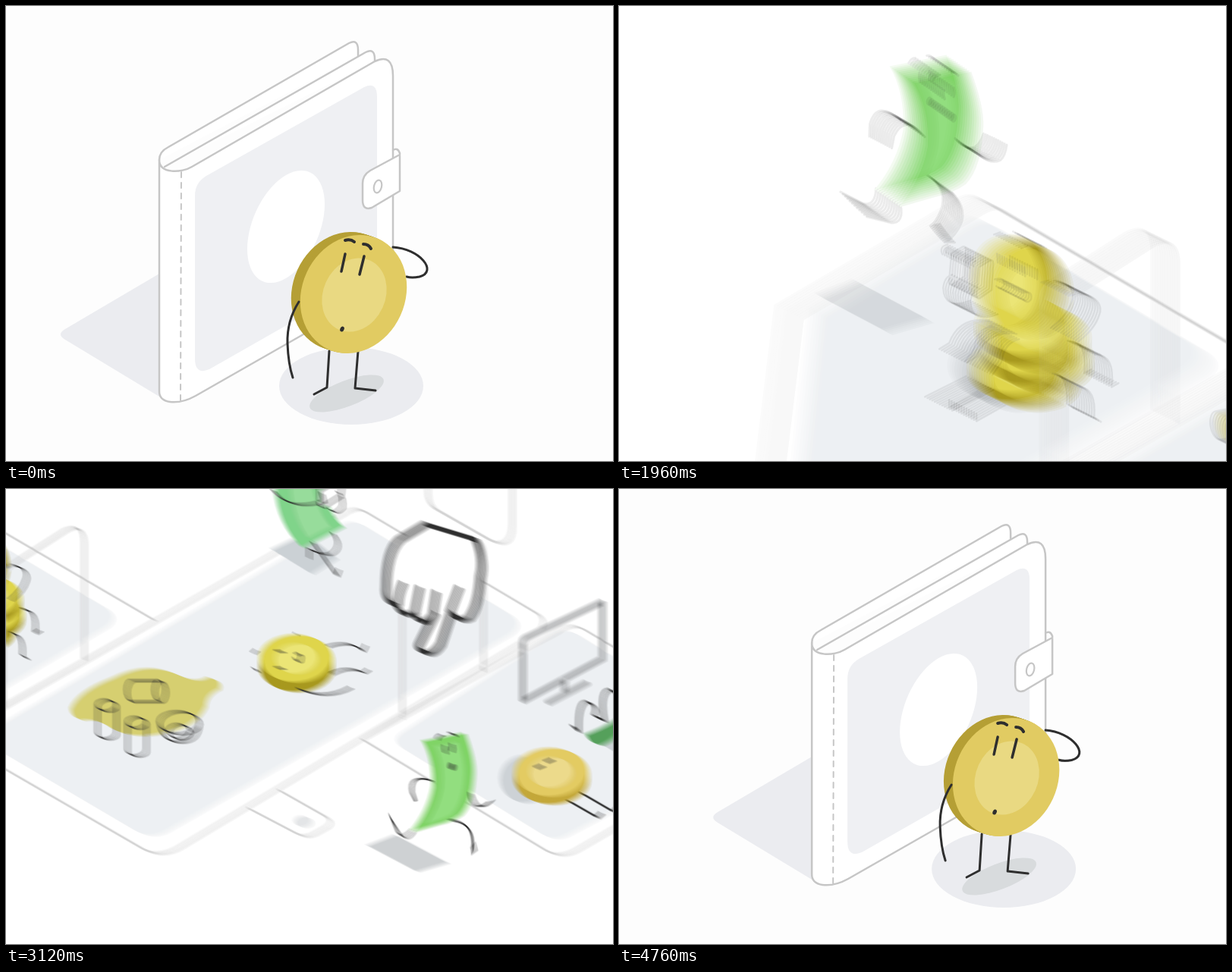
An HTML page with a canvas for the animation above (4.8 s loop, 800 by 600 pixels).

```html
<!DOCTYPE html>
<html lang="en">
<head>
<meta charset="utf-8">
<title>Runaway banknote</title>
<style>
html, body { margin: 0; width: 100%; height: 100%; overflow: hidden; background: #fdfdfd; }
canvas { display: block; width: 800px; height: 600px; }
</style>
</head>
<body>
<canvas id="stage" width="800" height="600"></canvas>
<script>
const LOOP = 4800, STEP = 40, SHUTTER = 15, SAMPLES = 12;
const INK = '#2e2e2e', LINE = '#c6c6c6', PALE = '#d3d3d3', PANEL = '#edf0f3';
const GOLD = { face: '#dfd54b', edge: '#a8991f', core: '#ebe576' };
const SAND = { face: '#e3cb62', edge: '#c4a83a', core: '#ecda8b' };

const screen = document.getElementById('stage').getContext('2d');
const buffer = document.createElement('canvas');
buffer.width = 800;
buffer.height = 600;
const g = buffer.getContext('2d');
g.lineCap = g.lineJoin = 'round';

const clamp = v => Math.max(0, Math.min(1, v));
const ramp = (t, a, b) => clamp((t - a) / (b - a));
const smooth = u => u * u * (3 - 2 * u);
const swing = (t, at, period) => Math.sin((t - at) / period * 2 * Math.PI);

function paint(p, fill, stroke, width = 2.5) {
  if (fill) { g.fillStyle = fill; g.fill(p); }
  if (stroke) { g.strokeStyle = stroke; g.lineWidth = width; g.stroke(p); }
}
const shape = (d, fill, stroke, width) => paint(new Path2D(d), fill, stroke, width);
const ink = (d, width = 2.5) => shape(d, null, INK, width);

function oval(x, y, rx, ry, turn, fill, stroke, width) {
  const p = new Path2D();
  p.ellipse(x, y, rx, ry, turn, 0, 2 * Math.PI);
  paint(p, fill, stroke, width);
}

function at(x, y, turn, scale, draw) {
  g.save();
  g.translate(x, y);
  g.rotate(turn);
  g.scale(scale, scale);
  draw();
  g.restore();
}
const limb = (x, y, turn, d, width = 3) => at(x, y, turn, 1, () => ink(d, width));

// Smooth curve through rows of [time, ...values]
function track(rows, t) {
  const last = rows.length - 1;
  if (t <= rows[0][0]) return rows[0].slice(1);
  if (t >= rows[last][0]) return rows[last].slice(1);
  const i = rows.findIndex((r, n) => n < last && t < rows[n + 1][0]);
  const a = rows[i], b = rows[i + 1], span = b[0] - a[0], u = (t - a[0]) / span;
  const slope = (n, c) => {
    const p = rows[Math.max(0, n - 1)], q = rows[Math.min(last, n + 1)];
    return (q[c] - p[c]) / (q[0] - p[0]) * span;
  };
  return a.slice(1).map((v, n) => {
    const c = n + 1, e = smooth(u);
    return v + (b[c] - v) * e + slope(i, c) * u * (1 - u) ** 2 - slope(i + 1, c) * u * u * (1 - u);
  });
}

// ---------- wallet ----------

function wallet() {
  shape('M202 353 L78 426 Q66 433 78 440 L202 515Z', '#ebecf0');
  oval(455, 501, 95, 51, 0, '#ebecf0');
  shape('M202 203 Q202 192 214 186 L452 49 Q464 43 464 58 V66', '#fff', LINE);
  shape('M209 212 L474 61 Q486 55 486 70 V73', '#fff', LINE);
  shape('M202 203 C202 222 232 220 245 212 L486 73 Q510 62 510 92 V340 Q510 366 490 377 ' +
    'L250 514 Q232 524 216 522 Q202 520 202 508Z', '#fff', LINE);
  g.setLineDash([7, 7]);
  shape('M231 219 L230 522', null, LINE, 2);
  g.setLineDash([]);
  shape('M249 250 Q249 233 264 224 L472 107 Q489 99 489 120 V338 Q489 353 475 361 ' +
    'L268 479 Q249 487 249 465Z', '#eff0f3');
  paint(hole(), '#fff');
  shape('M510 190 Q516 186 519 194 V244 L482 266 Q470 270 470 256 V234 Q470 223 480 217 L519 196',
    '#fff', LINE);
  oval(490, 238, 5, 8.5, 0.25, '#fff', LINE, 2.2);
}

function hole() {
  const p = new Path2D(), disc = new Path2D();
  disc.ellipse(0, 0, 51, 68, 0, 0, 2 * Math.PI);
  p.addPath(disc, new DOMMatrix([1, -0.577, 0, 1, 369, 291]));
  return p;
}

function peeker(t) {
  if (t < 440 || t > 1760) return;
  const drop = 200 * (1 - smooth(ramp(t, 440, 620)));
  const sway = -3.5 + 3.5 * Math.cos((t - 840) / 640 * Math.PI);
  const clip = hole();
  clip.rect(202, 0, 400, 291);
  g.save();
  g.clip(clip);
  g.translate(sway, drop);
  shape('M303 230 L390 178 Q417 240 406 312 L398 324 Q385 348 354 355 Q332 353 324 345 ' +
    'Q332 320 331 292 Q329 256 303 230Z', '#80c47e');
  shape('M326 241 L384 206 Q399 250 394 304 L397 326 Q384 347 354 354 Q342 354 334 350 ' +
    'Q342 318 341 290 Q340 262 326 241Z', '#92cb8e');
  shape('M396 300 L406 306 L398 323 L393 322Z', '#80c47e');
  ink('M348 218 L354 232 M362 211 L369 225', 3.2);
  ink('M331 190 Q335 185 340 184 M353 183 Q359 181 364 183', 3);
  shape('M374 295 Q379 288 384 290 Q387 283 390 288 Q392 295 393 303 Q381 302 374 295Z', INK);
  g.restore();
}

function coin(t) {
  const d = t > 4400 ? 0 : Math.max(0, t - 600);
  if (d > 760) return;
  const k = clamp(d / 240), mix = (a, b) => a + (b - a) * k;
  const dx = 0.6 * d + 0.001 * Math.max(0, d - 400) ** 2;
  const lift = 72 * Math.abs(Math.sin(d / 480 * Math.PI));
  const scared = k > 0.2;
  oval(449 + dx, 511 - 0.68 * dx, mix(52, 45), mix(17, 15), -0.37, '#d8dbdd');
  at(458 + dx, 380 - 0.68 * dx - lift, 0, 1, () => {
    const w = swing(t, 840, 200);
    if (scared) {
      limb(-44, 76, 0.45 * w, 'M0 0 Q-16 20 -18 42 L20 36');
      limb(4, 83, -0.22 * w, 'M0 0 Q22 24 25 72 L55 58');
      limb(58, 3, -0.5 * w, 'M0 0 Q34 -8 45 -60');
    } else {
      ink('M-32 75 L-35 123 L-52 132 M6 75 L2 124 L29 127', 3);
      limb(52, -62, 0.03 * Math.sin(t / 90), 'M0 0 C35 2 60 32 35 39 Q25 41 18 39');
    }
    const rx = mix(68, 58), ry = mix(80, 87), turn = mix(0.43, 0.16);
    for (let i = 6; i >= 0; i--) {
      oval(-mix(12, 16) * i / 6, -mix(4, 6) * i / 6, rx, ry, turn, i ? '#b59f35' : '#e1cb62');
    }
    oval(1, 1, mix(41, 37), mix(50, 53), turn, '#e9d982');
    if (scared) {
      ink('M-36 -44 V-20 M-15 -47 V-24', 3.5);
      ink('M-49 -67 Q-42 -73 -36 -73 M-18 -73 Q-10 -74 -5 -71', 4);
      shape('M6 49 Q8 36 18 30 Q26 28 25 36 Q21 49 6 49Z', INK);
      ink('M-83 -39 L-76 -38 M-73 -69 L-67 -63 M42 -84 L46 -90 M55 -63 L62 -66', 3.2);
      limb(-69, 17, -0.3 * w, 'M0 0 Q-25 3 -38 31 Q-47 52 -47 81');
    } else {
      ink('M-11 -53 L-16 -30 M14 -50 L8 -26', 3.5);
      ink('M-11 -71 Q-4 -73 1 -69 M13 -66 Q20 -66 23 -60', 4);
      oval(-15, 46, 2.6, 3.6, 0.4, INK);
      ink('M-72 10 Q-88 35 -87 65 Q-86 92 -80 110', 3);
    }
  });
}

// ---------- desk world ----------

function camera(t) {
  const u = ramp(t, 2320, 3120);
  const rush = 900 * (1 - ramp(t, 1800, 2320)) ** 2;
  const late = Math.max(0, t - 3120), exit = 0.0008 * Math.max(0, t - 3680) ** 2;
  return {
    x: 672 - 289 * u * u - 0.69 * late - exit + rush,
    y: 332 - 102 * u * u - 0.35 * late - exit / 2 + rush / 2,
    s: 1.37 - 0.37 * smooth(u)
  };
}

function disc(x, y, rx, ry, h, c) {
  for (let i = h; i > 0; i -= 2) oval(x, y + i, rx, ry, 0, c.edge);
  oval(x, y, rx, ry, 0, c.face);
  oval(x, y, rx * 0.61, ry * 0.64, 0, c.core);
}

function glass(x, y) {
  shape(`M${x - 17} ${y} V${y + 50} A17 10 0 0 0 ${x + 17} ${y + 50} V${y}`, null, INK);
  oval(x, y, 17, 10, 0, null, INK, 2.5);
}

function sheets() {
  shape('M-260 123 L-84 20 Q-74 14 -64 20 L196 172 L-109 344 L-300 450Z', '#fff', PALE);
  shape('M-230 125 L-90 40 Q-78 32 -66 38 L132 156 Q148 168 132 180 L-109 322 L-260 410Z', PANEL);
  shape('M-74 326 L444 31 Q460 20 476 30 L700 163 Q714 173 700 188 L231 469 Q205 486 180 473Z',
    '#fff', PALE);
  shape('M-20 317 L438 48 Q455 38 470 46 L664 164 Q682 177 664 190 L212 449 Q192 460 172 450 ' +
    'L-20 337 Q-34 327 -20 317Z', PANEL);
  shape('M320 420 L383 453 Q395 459 406 453 L422 444 Q432 437 420 430 L360 396', null, PALE);
  oval(391, 437, 11, 7, 0, '#e3e5e7');
  shape('M468 328 L734 182 Q748 176 762 184 L978 313 Q1000 327 980 342 L752 474 Q731 486 711 475Z',
    '#fff', PALE);
  shape('M522 320 L722 190 Q737 182 752 190 L960 318 Q972 328 960 338 L740 454 Q723 463 707 454 ' +
    'L522 340 Q508 330 522 320Z', PANEL);
  shape('M555 -60 V0 Q554 18 566 25 L638 66 Q666 78 666 46 V-60', null, PALE, 3);
}

const leaf = (x, y) =>
  shape(`M${x} ${y} V${y - 168} Q${x} ${y - 180} ${x + 10} ${y - 186} L${x + 82} ${y - 232} ` +
    `Q${x + 107} ${y - 244} ${x + 107} ${y - 214} V${y - 62}`, null, LINE, 2.6);

function stack() {
  oval(75, 270, 56, 42, 0.1, '#c9cdd0');
  ink('M48 280 L-10 309 M63 300 L22 323 V313');
  disc(103, 266, 58, 34, 12, GOLD);
  disc(119, 239, 59, 36, 14, GOLD);
  disc(114, 211, 60, 37, 14, GOLD);
  for (let i = 5; i >= 0; i--) oval(92 + i * 2.8, 156 - i * 0.4, 45, 60, -0.05, i ? GOLD.edge : GOLD.face);
  oval(92, 157, 27, 36, -0.05, GOLD.core);
  ink('M85 120 L86 132 M102 123 V136 M82 154 Q96 150 94 162 Q90 169 84 163');
  ink('M81 95 L89 92 M106 91 L114 95');
  ink('M75 208 Q35 203 22 238 L9 246 M78 215 Q58 220 55 245 L43 262');
  ink('M178 235 Q205 235 200 278 L209 273 M158 278 Q180 280 177 318 L186 324');
  ink('M143 158 C170 150 190 165 184 182 Q178 202 156 218');
  shape('M25 120 L40 111 Q44 110 44 115 L42 150 L26 161 Q21 162 22 155Z', '#fff', INK);
  ink('M50 182 Q15 195 14 165 Q16 150 26 148 M18 119 Q15 114 21 112 M13 121 Q8 111 20 108', 2.3);
}

function napper(t) {
  const rest = smooth(ramp(t, 2440, 2800));
  limb(672, 279, 2.9 * rest, 'M0 0 Q24 -29 10 -56', 2.5);
  ink('M730 302 Q770 290 792 310 L797 300 M726 357 Q760 335 794 349 L802 344');
  disc(672, 324, 65, 43, 17, GOLD);
  ink('M636 311 H649 M636 341 H649 M672 317 Q684 311 679 328 Q673 332 670 324');
  ink('M594 314 L600 309 M596 342 L602 347');
  limb(676, 379, 1.5 * rest, 'M0 0 Q24 -49 4 -94', 2.5);
}

function texter() {
  shape('M628 127 L690 98 L745 143 L700 171Z', '#cbd1d5');
  ink('M738 98 Q757 122 735 135 Q718 138 695 126 V142 M700 112 L745 174 L749 163');
  shape('M640 -60 Q615 60 683 124 L757 86 Q704 40 712 -95Z', '#80d48a');
  shape('M664 -60 Q646 50 694 108 L736 87 Q694 40 694 -80Z', '#97dc9b');
  shape('M714 20 L748 0 Q755 -2 755 5 L752 30 L720 50 Q713 52 714 42Z', '#fff', INK);
  ink('M630 20 Q660 58 722 40 L718 26 M733 55 Q745 65 755 50 Q757 30 748 24');
}

function spill(t) {
  const grow = 0.17 + 0.83 * smooth(ramp(t, 2300, 2760));
  if (t > 2240) at(183, 279, 0, grow, () => {
    g.translate(-183, -279);
    shape('M85 288 Q95 265 140 248 Q185 225 225 243 Q250 255 265 247 Q285 250 280 262 ' +
      'Q262 270 262 285 Q250 310 215 318 Q170 330 140 315 Q120 300 100 303 Q85 300 85 288Z', '#d6cf70');
  });
}

function tumbler(t) {
  const fall = ramp(t, 2320, 2440), full = 1 - ramp(t, 2320, 2560);
  at(402, 342 + 41 * fall * fall, -0.18 * (1 - fall), 1, () => {
    g.globalAlpha *= full;
    shape('M-26 -20 H24 V20 H-26 Q-38 0 -26 -20Z', '#dcd06a');
    oval(24, 0, 10, 19, 0, '#eae08e');
    g.globalAlpha = 1;
    shape('M24 -19 H-26 A10 19 0 0 0 -26 19 H24', null, INK);
    oval(24, 0, 10, 19, 0, null, INK, 2.5);
  });
}

function office() {
  oval(684, 381, 33, 31, 0, '#cdd2d6');
  ink('M757 399 L800 424 L806 419 M738 408 L778 431 L784 426');
  disc(718, 372, 48, 32, 10, SAND);
  ink('M698 366 L706 363 M711 358 L719 355', 2.5);
  shape('M680 202 Q680 197 685 194 L785 147 V222 L680 278Z', null, '#8f9193', 5);
  shape('M735 250 V268 M714 280 L764 254', null, '#a3a5a7', 6);
  shape('M776 330 L830 312 L878 334 L830 362Z', '#cbd1d5');
  ink('M746 311 L754 318 Q752 278 766 279 Q780 285 774 297 L788 304 Q780 264 796 263 Q812 272 817 300');
  shape('M818 245 Q850 228 876 209 L882 262 Q868 285 836 297 Q812 326 784 336 Q806 318 818 296Z', '#80d080');
  shape('M764 322 Q796 310 816 294 Q816 320 784 336 Q768 334 764 322Z', '#55a05b');
  ink('M831 282 Q836 320 844 352 M870 264 Q880 300 892 325');
  shape('M880 140 H1052 V190 Q1052 198 1040 199 H930 L917 213 L908 199 Q890 199 880 185Z', '#bcc1c4');
}

function world(t) {
  const c = camera(t);
  g.save();
  g.translate(c.x, c.y);
  g.scale(c.s, c.s);
  g.translate(-382, -228);
  // Props laid out in the close-up view
  const near = draw => at(-149 / 1.37, -20 / 1.37, 0, 1 / 1.37, draw);
  sheets();
  near(() => { stack(); texter(); });
  spill(t);
  near(() => {
    napper(t);
    glass(330, 409);
    glass(384, 440);
    shape('M425 440 Q428 475 461 475 Q494 475 497 440', null, INK);
    oval(461, 440, 36, 20, 0, null, INK, 2.5);
    oval(461, 456, 19, 13, 0, null, INK, 2.5);
    tumbler(t);
  });
  office();
  leaf(-5, 285);
  leaf(521, 300);
  g.restore();
}

// ---------- chase ----------

const RUN = [
  [1760, 358, 268, 0], [2000, 425, 250, -90], [2320, 455, 230, 0], [2700, 525, 292, 8],
  [3120, 582, 372, 17], [3400, 520, 350, 0], [3680, 445, 332, -3],
  [3960, 470, 380, 0], [4200, 330, 370, 0], [4480, -160, 300, 0]
];
const CHASE = [
  [1960, 1050, 190, 0.5], [2320, 788, 246, 0.5], [2700, 690, 250, 0.25], [3120, 555, 213, 0],
  [3400, 572, 190, 0], [3680, 600, 285, 0], [3880, 640, 420, 0.1], [4180, 420, -80, 0]
];

function runner(t) {
  if (t < 1760 || t > 4480) return;
  const [x, y, bob] = track(RUN, t), s = camera(t).s / 1.37, w = swing(t, 2320, 224);
  at(x, y, 0, s, () => {
    if (t > 1960) shape('M-144 135 L-94 116 L0 166 L-55 182Z', 'rgba(120,128,134,.36)');
    g.translate(0, bob / s);
    limb(5, 66, 0.6 * w, 'M0 0 Q34 12 30 42 Q28 58 22 64 L34 58');
    limb(-62, 84, -0.7 * w, 'M0 0 Q-8 22 -22 14 L-46 -10');
    limb(-30, -6, 0.5 * w, 'M0 0 Q-36 -20 -38 14 L-35 30');
    shape('M-44 -77 L31 -92 Q48 -46 47 -20 Q45 34 24 56 Q8 68 -20 74 L-65 87 ' +
      'Q-34 50 -26 6 Q-24 -42 -44 -77Z', '#80d466');
    shape('M-24 -68 L20 -77 Q34 -38 32 -12 Q30 34 10 56 Q-8 66 -42 74 ' +
      'Q-18 42 -12 6 Q-8 -38 -24 -68Z', '#92de7f');
    ink('M-5 -68 Q-6 -62 -4 -56 M8 -71 Q10 -65 8 -59', 3.2);
    ink('M-19 -81 Q-16 -88 -10 -88 M5 -91 Q10 -92 14 -87', 3);
    oval(8, -31, 4, 6, 0.2, INK);
    limb(42, 18, -0.6 * w, 'M0 0 Q8 18 22 18 Q30 16 38 4');
  });
}

function hand(t) {
  if (t < 1960 || t > 4180) return;
  const [x, y, turn] = track(CHASE, t);
  const shade = smooth(ramp(t, 3460, 3660)) * (1 - ramp(t, 3900, 4080));
  if (shade) {
    g.globalAlpha = shade;
    oval(x - 65, 478, 50, 26, 0.2, '#e9ebeb');
    g.globalAlpha = 1;
  }
  at(x, y, turn, camera(t).s, () => {
    if (t < 3440) {
      shape('M-10 -8 L10 -48 Q-2 -32 -14 -42 Q-18 -50 -16 -50 Q-34 -42 -40 -60 Q-56 -62 -54 -82 ' +
        'Q-54 -130 -36 -146 L-2 -166 L64 -146 Q76 -118 70 -96 Q68 -60 56 -43 Q42 -36 32 -50 ' +
        'L18 -8 Q8 8 -4 2 Q-14 0 -10 -8Z', '#fff', INK, 6);
      ink('M-32 -88 Q-38 -74 -38 -62 M-10 -82 L-16 -52 M12 -76 L7 -44 M42 -82 L30 -50', 5);
    } else {
      shape('M-138 -125 Q-130 -90 -105 -55 Q-82 -22 -50 -10 Q-30 -6 -36 -16 Q-10 2 -4 0 Q8 2 0 -14 ' +
        'Q12 -14 4 -30 Q14 -38 6 -48 L14 -66 Q12 -76 -4 -82 Q-14 -112 -38 -130 L-75 -152Z', '#fff');
      shape('M-138 -125 L-75 -152 L-62 -138 L-132 -102Z', '#d0d1d2');
      ink('M-138 -125 Q-130 -90 -105 -55 Q-82 -22 -50 -10 M-75 -152 Q-35 -130 -14 -98 Q-2 -82 14 -70', 6);
      ink('M-82 -52 Q-66 -22 -36 -8 M-64 -56 Q-46 -22 -8 0 M-46 -60 Q-28 -28 0 -14 M-28 -68 Q-14 -42 4 -30', 5);
      ink('M-14 -76 Q-4 -56 8 -46', 4);
    }
  });
}

// ---------- timeline ----------

// t is a moment within the shutter, now the time of the whole exposure
function scene(t, now) {
  g.fillStyle = now < 1800 || now > 4500 ? '#fdfdfd' : '#fff';
  g.fillRect(0, 0, 800, 600);
  if (t > 1800 && t < 4480) world(t);
  if (now < 2040 || now > 4480) {
    const shift = now > 4480
      ? 1180 * (1 - ramp(now, 4480, 4800)) ** 1.5
      : -900 * (Math.max(0, now - 1720) / 280) ** 2;
    at(shift, 0, 0, 1, () => {
      wallet();
      peeker(t);
      coin(t);
    });
  }
  // The moving camera smears the chase as well
  const a = camera(now), b = camera(t);
  at(b.x - a.x, b.y - a.y, 0, 1, () => {
    runner(t);
    hand(t);
  });
}

// Averaging several moments gives the motion blur
function frame(now) {
  for (let i = 0; i < SAMPLES; i++) {
    const t = now + (i / (SAMPLES - 1) - 0.5) * SHUTTER;
    scene(Math.max(0, Math.min(LOOP - 1, t)), now);
    screen.globalAlpha = 1 / (i + 1);
    screen.drawImage(buffer, 0, 0);
  }
}

const start = performance.now();
let shown = -1;
function tick() {
  const t = Math.floor((performance.now() - start) % LOOP / STEP) * STEP;
  if (t !== shown) frame(shown = t);
  requestAnimationFrame(tick);
}
tick();
</script>
</body>
</html>
```
